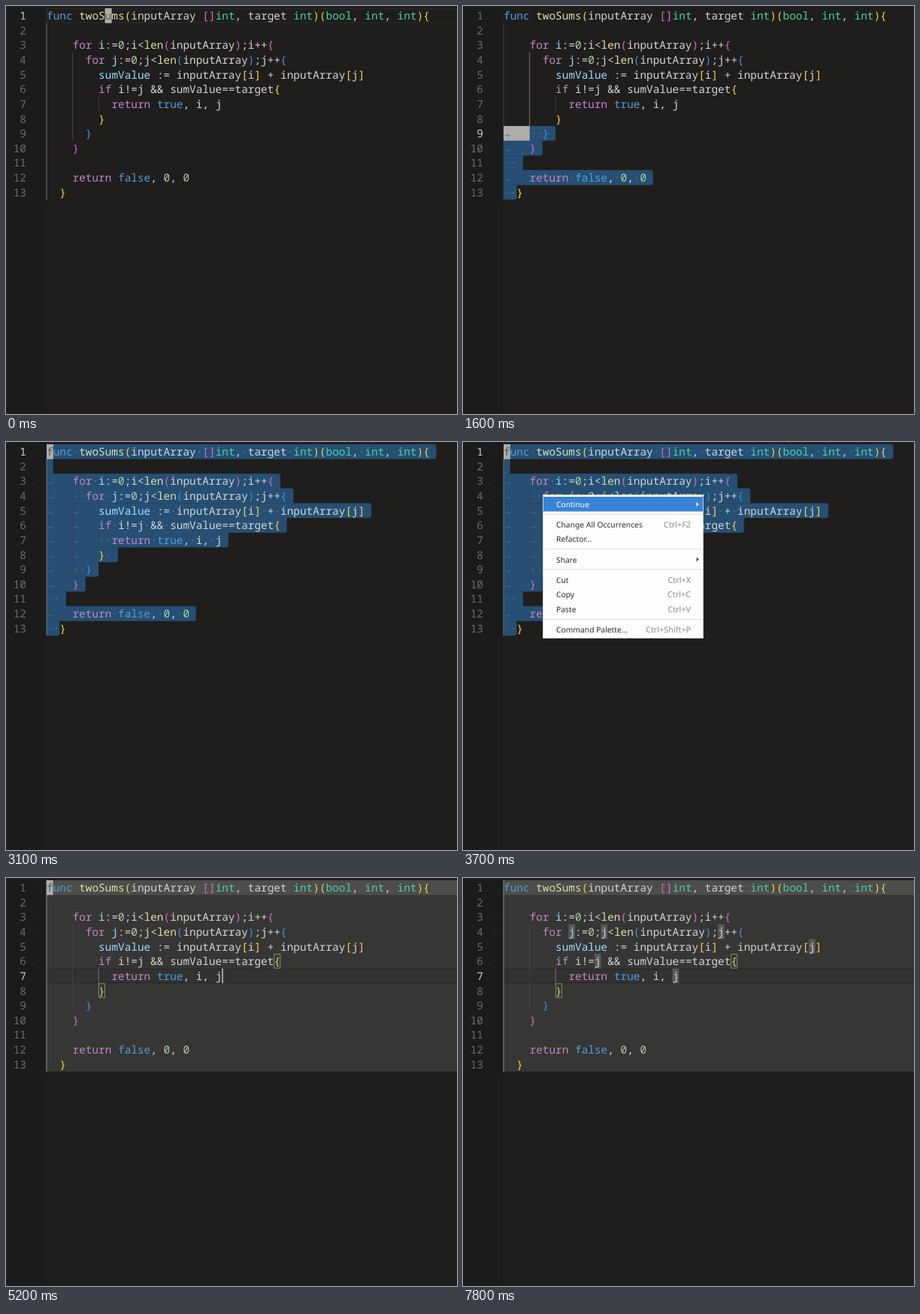
Write an HTML page that moves like this. It is 600 px wide and 544 px high and loops after 8000 ms.

```html
<!DOCTYPE html>
<html lang="en">
<head>
<meta charset="utf-8">
<title>Editor: optimize a selection</title>
<style>
  html, body { margin: 0; width: 100%; height: 100%; overflow: hidden; background: #1f1e1d; }
  svg { display: block; width: 600px; height: 544px; }
  text { white-space: pre; text-rendering: geometricPrecision; }
  .code { font: 14.4px "Noto Sans Mono", monospace; }
  .menu { font: 10.3px "Noto Sans", sans-serif; }
  .keys { font-size: 10.8px; text-anchor: end; }
</style>
</head>
<body>
<svg id="stage" viewBox="0 0 600 544"></svg>
<script>
const LOOP = 8000, LEFT = 54, TOP = 3, CELL = 8.64, ROW = 19.62;
const SOURCE = [
  'func twoSums(inputArray []int, target int)(bool, int, int){',
  '',
  '\tfor i:=0;i<len(inputArray);i++{',
  '\t  for j:=0;j<len(inputArray);j++{',
  '\t\tsumValue := inputArray[i] + inputArray[j]',
  '\t\tif i!=j && sumValue==target{',
  '\t\t  return true, i, j',
  '\t\t} ',
  '\t  }',
  '\t}',
  '  ',
  '\treturn false, 0, 0',
  '  }'
];
const LINES = SOURCE.map(s => s.replace(/\t/g, '    '));
const BRACKETS = ['#ecd54a', '#d06cc8', '#3795e0'];
const COLORS = [
  [/^(func|true|false)$/, '#569cd6'],
  [/^(for|if|return)$/, '#c586c0'],
  [/^(int|bool)$/, '#4ecfa4'],
  [/^(twoSums|len)$/, '#dcdcaa'],
  [/^\d+$/, '#b5cea8']
];

const colX = c => LEFT + c * CELL;
const rowY = r => TOP + (r - 1) * ROW;
const escape = s => s.replace(/&/g, '&amp;').replace(/</g, '&lt;');
const rect = (x, y, w, h, fill, extra = '') =>
  `<rect x="${x}" y="${y}" width="${w}" height="${h}" fill="${fill}" ${extra}/>`;
const label = (x, y, s, fill, cls) =>
  `<text x="${x}" y="${y}" fill="${fill}" class="${cls}">${escape(s)}</text>`;
const code = (row, col, s, fill) => label(colX(col), rowY(row) + 15.2, s, fill, 'code');
const cells = (row, col, n, fill) => rect(colX(col), rowY(row), n * CELL, ROW, fill);

function highlightCode() {
  let depth = 0, out = '';
  LINES.forEach((line, i) => {
    for (const m of line.matchAll(/\w+|[()[\]{}]|[^\s\w()[\]{}]+/g)) {
      const word = m[0];
      let fill = '#d4d4d4';
      if ('([{'.includes(word)) fill = BRACKETS[depth++ % 3];
      else if (')]}'.includes(word)) fill = BRACKETS[--depth % 3];
      else if (/^\s*:=/.test(line.slice(m.index + word.length))) fill = '#9cdcfe';
      else fill = (COLORS.find(([re]) => re.test(word)) || [0, fill])[1];
      out += code(i + 1, m.index, word, fill);
    }
  });
  return out;
}
const CODE = highlightCode();

function lineNumbers(active) {
  return LINES.map((_, i) => {
    const n = String(i + 1);
    return label(27 - n.length * CELL, rowY(i + 1) + 15.2, n,
      i + 1 === active ? '#cccccc' : '#6c6c6a', 'code');
  }).join('');
}

function guides(row) {
  const active = [6, 7, 8].includes(row) ? 8 : row >= 3 && row <= 10 ? 4 : 0;
  return [[0, 2, 13], [4, 4, 9], [8, 7, 7]].map(([col, from, to]) =>
    rect(colX(col) - .5, rowY(from), 1, (to - from + 1) * ROW,
      col === active ? '#777274' : '#414140')).join('');
}

function lineBorder(row) {
  return rect(LEFT, rowY(row) + .7, 560, ROW - 1.4, 'none', 'stroke="#2a2a29" stroke-width="1.2"');
}

const selectionEnd = row => row === 13 ? 2 : LINES[row - 1].length + 1;

function selection(from) {
  let out = '';
  for (let r = from; r <= 13; r++) {
    const end = selectionEnd(r), x = colX(end), y = rowY(r), b = y + ROW + .2;
    const top = r === from || selectionEnd(r - 1) < end ? 3 : 0;
    const bottom = r === 13 || selectionEnd(r + 1) < end ? 3 : 0;
    out += `<path fill="#264f73" d="M${LEFT} ${y}H${x - top}q${top} 0 ${top} ${top}V${b - bottom}` +
      `q0 ${bottom} ${-bottom} ${bottom}H${LEFT}z"/>`;
  }
  return out;
}

function whitespace(from) {
  let out = '';
  for (let r = from; r <= 13; r++) {
    let col = 0;
    for (const ch of SOURCE[r - 1]) {
      if (ch === '\t') out += code(r, col, '→', '#47708f');
      if (ch === ' ') out += code(r, col, '·', '#54799a');
      col += ch === '\t' ? 4 : 1;
    }
  }
  return out;
}

const block = (row, col) =>
  cells(row, col, col === 0 && SOURCE[row - 1][0] === '\t' ? 4 : 1, '#aeada8');

function blockGlyph(row, col) {
  const ch = (LINES[row - 1][col] || '').trim();
  return ch ? block(row, col) + code(row, col, ch, '#5c5c5a') : '';
}

const bracketBox = (row, col) => rect(colX(col) + .3, rowY(row) + .5, CELL - .6, ROW - 1,
  '#2b4030', 'fill-opacity=".5" stroke="#868684"');

function chevrons(opacity) {
  return [1, 3, 4, 6].map(r => {
    const y = rowY(r) + 8;
    return `<path d="M39 ${y}l3 3 3 -3" fill="none" stroke="#555" opacity="${opacity}"/>`;
  }).join('');
}

const panel = (x, y, w, h) => rect(x, y, w, h, '#fdfdfd', 'stroke="#c9c9c9"');

function menuItem(x, y, w, right, [name, keys], hovered) {
  const bar = hovered ? rect(x, y - 10, w, 19.6, '#3a82d6') : '';
  let tail = '';
  if (keys === '>') tail = `<path d="M310.5 ${y - 3}l3.5 3 -3.5 3z" fill="${hovered ? '#dce9f8' : '#555'}"/>`;
  else if (keys) tail = label(right, y + 4, keys, '#8c8c8c', 'menu keys');
  return bar + label(x + 17, y + 4, name, hovered ? '#ffffff' : '#2e2e2e', 'menu') + tail;
}

function contextMenu(hover) {
  const items = [
    [83, 'Continue', '>'], [110, 'Change All Occurrences', 'Ctrl+F2'], [129.3, 'Refactor...'],
    [156.5, 'Share', '>'], [184, 'Cut', 'Ctrl+X'], [203.2, 'Copy', 'Ctrl+C'],
    [222.5, 'Paste', 'Ctrl+V'], [250, 'Command Palette...', 'Ctrl+Shift+P']
  ];
  return panel(106.5, 70.5, 213, 191) +
    [96.5, 143, 170, 236.5].map(y => rect(107, y - .5, 212, 1, '#dedede')).join('') +
    items.map(([y, ...item], i) => menuItem(107, y, 212, 303, item, i === hover)).join('');
}

function subMenu(hover) {
  const items = [
    ['Add Highlighted Code to Context', 'Ctrl+Shift+M'], ['Fix this Code'],
    ['Optimize this Code'], ['Write a Docstring for this Code'], ['Write Comments for this Code']
  ];
  return panel(318.5, 70.5, 260, 101) +
    items.map((item, i) => menuItem(318, 83 + i * 19.3, 260, 562, item, i === hover)).join('');
}

function diffRows() {
  return rect(LEFT, TOP, 546, ROW * 13, '#363635') + rect(LEFT, TOP, 546, ROW, '#4d4d4b') +
    rect(LEFT, rowY(7), 546, ROW, '#323232') + lineBorder(7) +
    rect(LEFT - .5, TOP, 1, ROW * 13, '#777274');
}

function occurrences() {
  return LINES.map((line, i) => [...line.matchAll(/\bj\b/g)]
    .map(m => cells(i + 1, m.index, 1, '#585857')).join('')).join('');
}

function sceneAt(t) {
  const s = { row: 1, col: 0, chevron: 0, menu: null, sub: null };
  if (t < 1000) {
    s.col = 9;
    s.block = t < 100 || t >= 600;
  } else if (t < 1200) {
    Object.assign(s, { row: 13, col: 2, block: true, brackets: true });
  } else if (t < 5200) {
    s.row = Math.max(1, 13 - Math.floor((t - 1200) / 100));
    s.selected = s.block = true;
    s.chevron = Math.min(.3, Math.max(0, Math.floor((t - 2600) / 100) * .1));
    if (t >= 3200 && t < 5100) s.menu = t < 3500 ? -1 : 0;
    if (t >= 4000 && t < 5100) s.sub = t < 4400 ? -1 : t < 4600 ? 0 : t < 4700 ? 1 : 2;
  } else {
    s.row = 7;
    s.diff = true;
    s.chevron = .3;
    s.ghost = t < 5300;
    s.marks = t >= 5500;
    s.caret = t < 5800 || Math.floor((t - 5800) / 500) % 2 === 1;
  }
  return s;
}

function draw(s) {
  let out = rect(0, 0, 600, 544, '#1f1e1d') + rect(0, 0, 53, 544, '#1b1b1b');
  if (s.diff) out += diffRows();
  else if (!s.selected) out += lineBorder(s.row);
  if (s.selected) out += selection(s.row);
  out += guides(s.row);
  if (s.diff) out += rect(LEFT - .5, TOP, 1, ROW * 13, '#777274');
  if (s.marks) out += occurrences();
  if (s.brackets) out += bracketBox(1, 58) + bracketBox(13, 2);
  if (s.diff) out += bracketBox(6, 35) + bracketBox(8, 8);
  if (s.block) out += block(s.row, s.col);
  if (s.selected) out += whitespace(s.row);
  out += CODE + lineNumbers(s.row) + chevrons(s.chevron);
  if (s.block) out += blockGlyph(s.row, s.col);
  if (s.ghost) out += blockGlyph(1, 0);
  if (s.caret) out += rect(colX(27), rowY(7), 1.5, ROW, '#c4c4c2');
  if (s.menu !== null) out += contextMenu(s.menu);
  if (s.sub !== null) out += subMenu(s.sub);
  return out;
}

const stage = document.getElementById('stage');
const start = performance.now();
let shown = '';
function tick() {
  const scene = sceneAt((performance.now() - start) % LOOP);
  const key = JSON.stringify(scene);
  if (key !== shown) {
    shown = key;
    stage.innerHTML = draw(scene);
  }
  requestAnimationFrame(tick);
}
tick();
</script>
</body>
</html>
```
